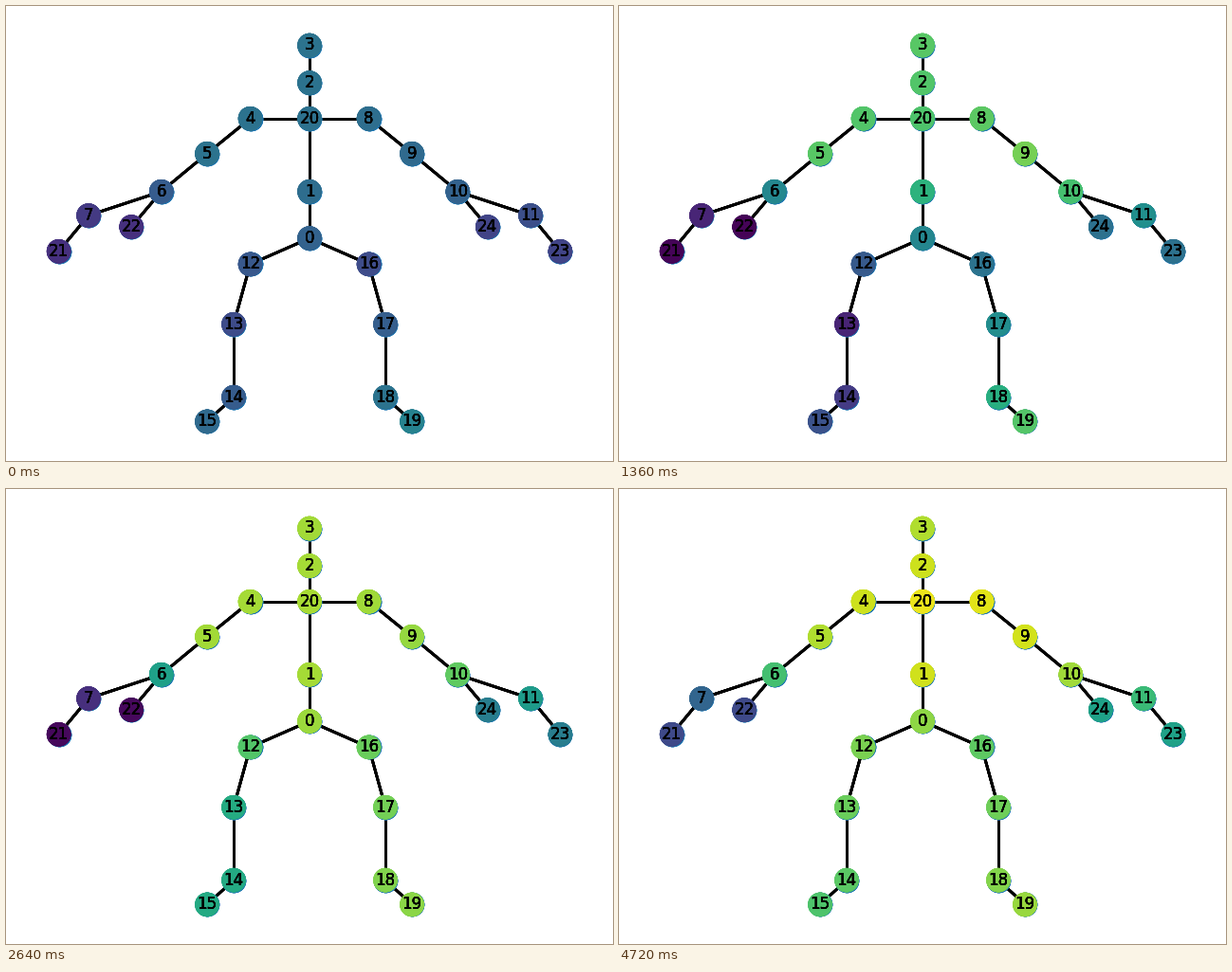
Write a matplotlib script that moves like this. It is 640 px wide and 480 px high and loops after 4.8 s.

```python
import matplotlib.pyplot as plt
import numpy as np
from matplotlib.animation import FuncAnimation
from matplotlib.collections import LineCollection

W, H, DPI = 640, 480, 100
FRAMES, STEP_MS = 60, 80
MID = W / 2
OVERPRINT = 5

# Joint positions in pixels: the spine, then left/right pairs mirrored about it.
SPINE = {3: 41.5, 2: 81, 20: 118.7, 1: 195.7, 0: 245}
PAIRS = {
    (4, 8): (62.5, 118.7), (5, 9): (108, 155.7), (6, 10): (156.3, 195.7),
    (7, 11): (233, 221), (21, 23): (264.4, 258.8), (22, 24): (187.8, 233),
    (12, 16): (62.5, 272.4), (13, 17): (80, 335.7), (14, 18): (80, 412.6),
    (15, 19): (108, 438.4),
}
CHAINS = [
    (3, 2, 20, 1, 0),
    (20, 4, 5, 6, 7, 21), (6, 22),
    (20, 8, 9, 10, 11, 23), (10, 24),
    (0, 12, 13, 14, 15), (0, 16, 17, 18, 19),
]

# Activity of the leading body parts at a few key frames.
KEYS = (0, 8, 17, 27, 33, 43, 59)
HEAD = (0.38, 0.79, 0.74, 0.78, 0.86, 0.87, 0.88)
CHEST = (0.37, 0.81, 0.72, 0.77, 0.87, 0.92, 0.97)
PELVIS = (0.31, 0.78, 0.46, 0.57, 0.85, 0.84, 0.83)
LEFT_HAND = (0.14, 0.05, 0.01, 0.08, 0.02, 0.00, 0.22)
RIGHT_HAND = (0.20, 0.11, 0.37, 0.48, 0.42, 0.24, 0.57)
RIGHT_ELBOW = (0.34, 0.66, 0.79, 0.84, 0.84, 0.83, 0.93)
LEFT_KNEE = (0.23, 0.45, 0.10, 0.20, 0.61, 0.61, 0.77)

pos = {j: (MID, y) for j, y in SPINE.items()}
for (left, right), (dx, y) in PAIRS.items():
    pos[left] = (MID - dx, y)
    pos[right] = (MID + dx, y)
joints = sorted(pos)
xs, ys = zip(*(pos[j] for j in joints))


def ease(frame, values):
    i = min(np.searchsorted(KEYS, frame, side="right") - 1, len(KEYS) - 2)
    t = (frame - KEYS[i]) / (KEYS[i + 1] - KEYS[i])
    return mix(values[i], values[i + 1], t * t * (3 - 2 * t))


def mix(a, b, t):
    return a + (b - a) * t


def activity(frame):
    """Ease the leading parts and blend the other joints between them."""
    head, chest, pelvis, l_hand, r_hand, r_elbow, l_knee = (
        ease(frame, part) for part in
        (HEAD, CHEST, PELVIS, LEFT_HAND, RIGHT_HAND, RIGHT_ELBOW, LEFT_KNEE))
    v = np.empty(len(joints))

    v[3], v[20], v[0] = head, chest, pelvis
    v[2] = v[4] = mix(head, chest, 0.5)
    v[1] = mix(chest, pelvis, 0.3)

    v[5] = head
    v[6] = mix(chest, l_hand, 0.36)
    v[7] = mix(l_hand, v[6], 0.21)
    v[[21, 22]] = l_hand

    v[8] = mix(chest, r_elbow, 0.4)
    v[9] = r_elbow
    v[10] = mix(r_elbow, r_hand, 0.2)
    v[11] = mix(r_elbow, r_hand, 0.7)
    v[[23, 24]] = r_hand

    v[12] = mix(pelvis, l_knee, 0.5)
    v[13] = l_knee
    v[15] = mix(l_knee, 0.6, 0.3)
    v[14] = mix(l_knee, v[15], 0.5)

    v[16] = pelvis - 0.08
    v[19] = mix(head, 0.7, 0.2)
    v[17] = mix(v[16], v[19], 0.3)
    v[18] = mix(v[16], v[19], 0.7)
    return v


fig = plt.figure(figsize=(W / DPI, H / DPI), dpi=DPI, facecolor="white")
ax = fig.add_axes([0, 0, 1, 1])
bones = [(pos[a], pos[b]) for chain in CHAINS for a, b in zip(chain, chain[1:])]
nodes = []

# Overprinting hardens the edges of lines, discs and labels.
for _ in range(OVERPRINT):
    ax.add_collection(LineCollection(bones, colors="black", linewidths=2, zorder=1))
    ax.scatter(xs, ys, s=300, c="#1f78b4", zorder=2)
    nodes.append(ax.scatter(xs, ys, s=300, c=activity(0), cmap="viridis",
                            vmin=0, vmax=1, zorder=3))
    for j in joints:
        ax.text(*pos[j], str(j), family="DejaVu Sans", size=12, color="black",
                ha="center", va="center", zorder=4)

ax.set_xlim(0, W)
ax.set_ylim(H, 0)
ax.axis("off")


def update(frame):
    levels = activity(frame)
    for layer in nodes:
        layer.set_array(levels)
    return nodes


anim = FuncAnimation(fig, update, frames=FRAMES, interval=STEP_MS,
                     repeat=True, repeat_delay=0, blit=False)
plt.show()
```
